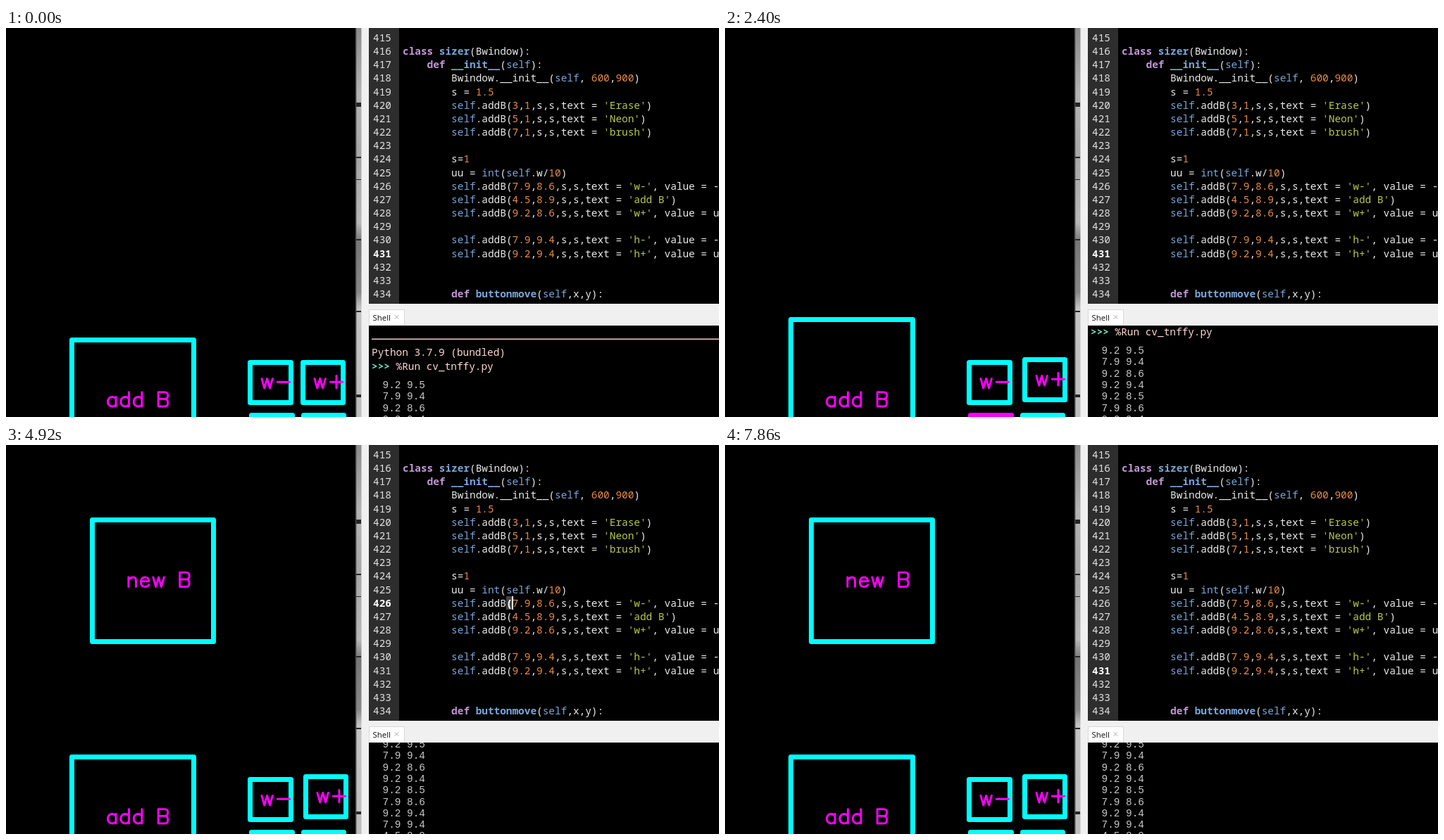
An HTML page with a canvas that plays this animation: 1012 px wide and 553 px high, repeating every 8000 ms.

```html
<!DOCTYPE html>
<html lang="en">
<head>
<meta charset="utf-8">
<title>Button sizer</title>
<style>
  html, body { margin: 0; width: 100%; height: 100%; overflow: hidden; background: #000; }
  canvas { display: block; }
</style>
</head>
<body>
<canvas id="stage" width="1012" height="553"></canvas>
<script>
const LOOP = 8000;
const CYAN = '#00ffff', MAGENTA = '#ff00ff';
const FG = '#eaeaea', BLUE = '#7aa6da', PURPLE = '#c397d8', ORANGE = '#e78c45', GREEN = '#b9ca4a';
const PINK = '#ffd8d6';
const CHAR = 8.64, ROW = 19.16, SHELL_ROW = 16.3, CODE_X = 563, SHELL_TOP = 423;
const MONO_FACE = '14.4px "Noto Sans Mono", monospace';
const MONO = '500 ' + MONO_FACE, MONO_BOLD = 'bold ' + MONO_FACE;
const COURIER = '14.4px "Liberation Mono", monospace';

const ctx = document.getElementById('stage').getContext('2d');

const code = `
class sizer(Bwindow):
    def __init__(self):
        Bwindow.__init__(self, 600,900)
        s = 1.5
        self.addB(3,1,s,s,text = 'Erase')
        self.addB(5,1,s,s,text = 'Neon')
        self.addB(7,1,s,s,text = 'brush')

        s=1
        uu = int(self.w/10)
        self.addB(7.9,8.6,s,s,text = 'w-', value = -uu)
        self.addB(4.5,8.9,s,s,text = 'add B')
        self.addB(9.2,8.6,s,s,text = 'w+', value = uu)

        self.addB(7.9,9.4,s,s,text = 'h-', value = -uu)
        self.addB(9.2,9.4,s,s,text = 'h+', value = uu)


        def buttonmove(self,x,y):`.split('\n');

const output = ['9.2 9.5', '7.9 9.4', '9.2 8.6', '9.2 9.4', '9.2 8.5',
                '7.9 8.6', '9.2 9.4', '7.9 9.4', '4.5 8.9'];

// Single-stroke lettering: advance width and path from the baseline
const bowl = 'M15-11C12-15 7-15 4-11Q2-7 4-3C7 1 12 1 15-3';
const glyphs = {
  a: [19, bowl + 'M15-14V0'],
  d: [19, bowl + 'M15-21V0'],
  B: [21, 'M4-21V0H13Q18 0 18-5.5T13-11H4M13-11Q18-11 18-16T13-21H4'],
  n: [19, 'M4-14V0M4-10Q7-14 10.5-14Q15-14 15-9V0'],
  e: [18, 'M3-8H15C14.5-16 3-16 3-7C3 2 12 1 15-3'],
  w: [22, 'M3-14 7 0 11-14 15 0 19-14'],
  '+': [26, 'M13-18V0M4-9H22'],
  '-': [26, 'M4-9H22'],
  ' ': [16, '']
};
for (const key in glyphs) glyphs[key][1] = new Path2D(glyphs[key][1]);

function rect(x, y, w, h, color) {
  ctx.fillStyle = color;
  ctx.fillRect(x, y, w, h);
}

function text(str, x, y, color, font) {
  ctx.font = font;
  ctx.fillStyle = color;
  ctx.fillText(str, x, y);
}

function strokeLabel(str, x, y) {
  ctx.save();
  ctx.translate(x, y);
  ctx.scale(.97, .97);
  ctx.strokeStyle = MAGENTA;
  ctx.lineWidth = 3;
  for (const ch of str) {
    const [advance, path] = glyphs[ch];
    ctx.stroke(path);
    ctx.translate(advance, 0);
  }
  ctx.restore();
}

function button(left, top, right, bottom, hover, pressed) {
  if (pressed) rect(left + 4.5, top + 4.5, right - left - 9, bottom - top - 9, CYAN);
  ctx.strokeStyle = hover ? MAGENTA : CYAN;
  ctx.lineWidth = 7;
  ctx.strokeRect(left, top, right - left, bottom - top);
}

function drawButtons(t) {
  const during = (from, to) => t >= from && t < to;
  const wide = during(1020, 1620), tall = during(2100, 2520);
  const lift = t >= 1080 ? 4 : 0;

  if (t >= 3120) {
    button(122.5, 106.5, 294.5, 279.5);
    strokeLabel('new B', 170, 201.5);
  }
  button(wide ? 64.5 : 93.5, tall ? 414.5 : 443.5, wide ? 294.5 : 266.5, 620,
         during(2940, 3540), during(3120, 3240));
  strokeLabel('add B', 141.5, 538);

  button(346.5, 475.5, 404.5, 532.5,
         during(1440, 1860) || during(3840, 4080), during(1620, 1680));
  strokeLabel('w-', 360, 512);

  button(421.5 + lift, 475.5 - lift, 478.5 + lift, 532.5 - lift,
         during(1020, 1440), during(1020, 1080));
  strokeLabel('w+', 435 + lift, 512 - lift);

  button(348.5, 550.5, 406.5, 608, during(1860, 1920) || during(2400, 2880));
  button(422.5, 550.5, 479.5, 608, during(1920, 2400));
}

function drawWallStrip() {
  const wall = ctx.createLinearGradient(0, 0, 0, 553);
  [[0, '#8c8c8c'], [.17, '#b4b4b4'], [.34, '#a8a8a8'], [.5, '#b8b8b8'], [.55, '#777'],
   [.68, '#888'], [.72, '#c4c4c4'], [1, '#bdbdbd']].forEach(s => wall.addColorStop(...s));
  rect(496, 0, 9, 553, wall);
  rect(496, 0, 1.5, 553, '#555');
  for (const [y, h] of [[106, 6], [183, 2], [215, 1], [300, 2], [402, 2], [521, 4]])
    rect(497, y, 7, h, '#262626');
}

function codeLine(line, y) {
  const token = /'[^']*'|\w+(?:(?<=\d)\.\d+)?|\S/g;
  for (const { 0: part, index } of line.matchAll(token)) {
    const keyword = /^(class|def)$/.test(part);
    const declared = /(class|def) $/.test(line.slice(0, index));
    const color = keyword ? PURPLE
      : declared || /^(self|int)$/.test(part) ? BLUE
      : part[0] === "'" ? GREEN
      : /^\d/.test(part) ? ORANGE : FG;
    text(part, CODE_X + index * CHAR, y, color, keyword || declared ? MONO_BOLD : MONO);
  }
}

function drawEditor(t) {
  const onFirst = t >= 4920 && t < 5160;
  const current = onFirst ? 426 : 431;
  const caretX = column => CODE_X + column * CHAR;

  rect(515, 0, 43, 392, '#2d2d2d');
  if (onFirst) rect(caretX(17), 215, CHAR, 19, '#444');
  code.forEach((line, i) => {
    const y = Math.round(19 + i * ROW), number = 415 + i;
    const active = number === current;
    text(number, 521, y, active ? '#fff' : '#e2e2e2', active ? MONO_BOLD : MONO);
    codeLine(line, y);
  });

  if (onFirst) {
    text('(', caretX(17), 230, '#fff', MONO_BOLD);
    rect(718, 215, 2, 19, '#fff');
  }
  const blinkOn = [[5160, 5400], [5580, 6000], [6180, 6600], [6840, 7260], [7440, 7860]]
    .some(([from, to]) => t >= from && t < to);
  if (blinkOn) rect(Math.round(caretX(32)), 311, 2, 19, '#fff');
}

function drawShell(t) {
  const scroll = SHELL_ROW * [1080, 1680, 2160, 2580, 3180].filter(at => t >= at).length;
  ctx.save();
  ctx.beginPath();
  ctx.rect(515, SHELL_TOP, 497, 553 - SHELL_TOP);
  ctx.clip();
  ctx.translate(0, -Math.round(scroll));
  rect(519, 441.5, 493, 1.5, '#f0cccc');
  text('Python 3.7.9 (bundled)', 519, 466, PINK, MONO);
  text('>>>', 519, 486, '#6ce8c4', MONO_BOLD);
  text('%Run cv_tnffy.py', 519 + 4 * CHAR, 486, PINK, MONO);
  output.forEach((line, i) => text(line, 534.5, Math.round(512 + i * SHELL_ROW), '#c8c8c8', COURIER));
  ctx.restore();
}

function drawFrames() {
  rect(504.5, 0, 10.5, 553, '#f0f0f0');
  rect(505, 392, 507, SHELL_TOP - 392, '#f0f0f0');
  rect(515, 400, 51, SHELL_TOP - 400, '#d9d9d9');
  rect(516, 401, 49, SHELL_TOP - 401, '#fff');
  text('Shell', 520.5, 416, '#111', '11.4px "Open Sans", sans-serif');
  ctx.strokeStyle = '#aaa';
  ctx.lineWidth = 1;
  ctx.stroke(new Path2D('M552 408.5l5 5m0-5l-5 5'));
}

function draw(t) {
  rect(0, 0, 1012, 553, '#000');
  ctx.lineJoin = ctx.lineCap = 'round';
  drawButtons(t);
  drawWallStrip();
  drawEditor(t);
  drawFrames();
  drawShell(t);
}

const start = performance.now();
function tick() {
  draw((performance.now() - start) % LOOP);
  requestAnimationFrame(tick);
}
tick();
</script>
</body>
</html>
```
